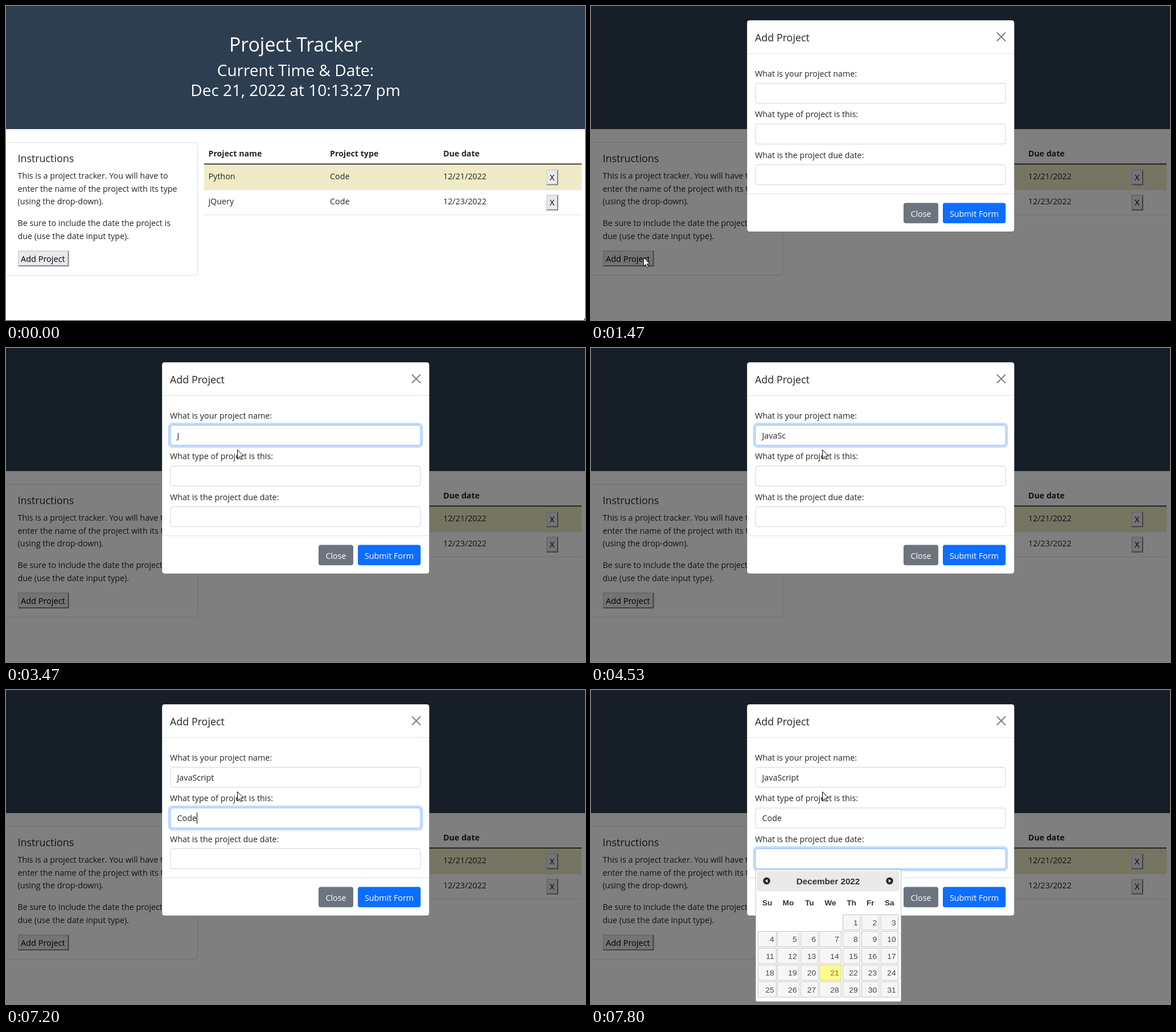
An HTML page for the animation above (8000 ms loop, 1017 by 551 pixels).

```html
<!DOCTYPE html>
<html lang="en">
<head>
<meta charset="utf-8">
<title>Project Tracker</title>
<style>
  html, body { margin: 0; width: 100%; height: 100%; overflow: hidden; background: #fff; }
  svg { display: block; width: 1017px; height: 551px; }
  text { font: 14.3px "Open Sans", "Noto Sans", sans-serif; fill: #212529; white-space: pre; }
  .h1 { font-size: 33.8px; fill: #fff; }
  .h2 { font-size: 28px; fill: #fff; }
  .h5 { font-size: 17.9px; }
  .th { font-size: 14.2px; font-weight: 700; }
  .btn { font-size: 14.5px; fill: #000; }
  .white { fill: #fff; }
  .mid { text-anchor: middle; }
  .cal { font: 13.7px "Liberation Sans", Arial, sans-serif; fill: #454545; }
  .calhead { font-weight: 700; fill: #333; text-anchor: middle; }
  .caltitle { font-size: 15.2px; }
  .end { text-anchor: end; }
  .today { fill: #777620; }
</style>
</head>
<body>
<svg id="stage" viewBox="0 0 1017 551"></svg>
<script>
const LOOP = 8000, TICK = 200 / 3;
const OPEN = 1470, PRESS = 1400, CALENDAR = 7330;

const fields = [
  { label: 'What is your project name:', word: 'JavaScript', y: 135.5, focus: 2400,
    keys: [3270, 3600, 3730, 3800, 4130, 4470, 4800, 5000, 5070, 5200],
    off: [2930, 3470, 4000, 4530, 5530], on: [] },
  { label: 'What type of project is this:', word: 'Code', y: 207, focus: 5670,
    keys: [6070, 6400, 6470, 6670], off: [6200, 6730], on: [7200] },
  { label: 'What is the project due date:', word: '', y: 278.5, focus: CALENDAR,
    keys: [], off: [7800], on: [] }
];

// Cursor legs: first tick, last tick, from, to
const legs = [
  [4, 13, [1016, 548], [92, 441]],
  [25, 32, [92, 441], [400, 151]],
  [38, 40, [400, 151], [406, 178]]
];

const text = (x, y, s, cls = '', id = '') =>
  `<text x="${x}" y="${y}" class="${cls}" id="${id}">${s}</text>`;
const rect = (x, y, w, h, fill, more = '') =>
  `<rect x="${x}" y="${y}" width="${w}" height="${h}" fill="${fill}" ${more}/>`;
const button = (x, y, w, h, id = '') => `<g id="${id}">` +
  rect(x, y, w, h, '#e9e9ed') +
  `<path d="M${x + w - 1} ${y}V${y + h - 1}H${x}" fill="none" stroke="#85858c" stroke-width="2"/>` +
  `<path d="M${x + 1} ${y + h - 1}V${y + 1}H${x + w - 1}" fill="none" stroke="#d6d6da" stroke-width="2"/></g>`;

function page() {
  const lines = [[303, 'This is a project tracker. You will have to'],
    [325.5, 'enter the name of the project with its type'], [348, '(using the drop-down).'],
    [386, 'Be sure to include the date the project is'], [408.5, 'due (use the date input type).']];
  const rows = [['Python', '12/21/2022'], ['jQuery', '12/23/2022']];
  return rect(0, 0, 1017, 216, '#2c3e50') +
    text(508.5, 79.5, 'Project Tracker', 'h1 mid') +
    text(508.5, 122.5, 'Current Time &amp; Date:', 'h2 mid') +
    text(508.5, 157.5, '', 'h2 mid', 'clock') +
    rect(-4.5, 239.5, 341, 233, '#fff', 'rx="4" stroke="#dfdfdf"') +
    text(20.5, 274, 'Instructions', 'h5') +
    lines.map(([y, s]) => text(20.5, y, s)).join('') +
    button(21, 429, 89.5, 28, 'add') + text(26, 449, 'Add Project', 'btn') +
    text(355.5, 264, 'Project name', 'th') + text(569, 264, 'Project type', 'th') +
    text(768, 264, 'Due date', 'th') +
    rect(348, 278, 663, 44, '#eeebc6') + rect(348, 276.5, 663, 1.7, '#212529') +
    rows.map(([name, due], i) => {
      const y = 304 + i * 44.3;
      return rect(348, 322 + i * 44, 663, 1, '#dee2e6') +
        text(355.5, y, name) + text(569, y, 'Code') + text(768, y, due) +
        button(949, y - 17, 21, 27.5) + text(959.3, y + 2, 'X', 'btn mid');
    }).join('');
}

function modal() {
  return rect(0, 0, 1017, 551, '#000', 'opacity=".5"') +
    rect(274, 25, 469.5, 371, '#fff', 'rx="4.5" stroke="#000" stroke-opacity=".2"') +
    text(288, 62, 'Add Project', 'h5') +
    '<path d="M713.5 47L727.5 61M727.5 47L713.5 61" stroke="#7f7f7f" stroke-width="2" stroke-linecap="round"/>' +
    rect(274.5, 83, 468.5, 1, '#dee2e6') + rect(274.5, 329, 468.5, 1, '#dee2e6') +
    fields.map((f, i) => text(288, f.y - 12, f.label) +
      `<rect id="glow${i}" fill="none" stroke="#0d6efd"/>` +
      rect(288.9, f.y, 439.2, 35.2, '#fff', `rx="4" id="box${i}"`) +
      text(300.5, f.y + 23.3, '', '', 'value' + i)).join('') +
    rect(300, 0, 1, 20, '#000', 'id="caret"') +
    rect(549, 345.5, 61, 35.7, '#6c757d', 'rx="3.8"') + text(579.5, 370, 'Close', 'white mid') +
    rect(618, 345.5, 110.3, 35.7, '#0d6efd', 'rx="3.8"') + text(673, 370, 'Submit Form', 'white mid');
}

function calendar() {
  const left = [293.5, 327.5, 368.5, 401.5, 442.5, 475.5, 509];
  const width = [32, 38, 30.5, 38, 30, 30.5, 30.5];
  const arrow = (x, d) => `<circle cx="${x}" cy="335" r="6.2" fill="#2b2b2b"/>` +
    `<path d="M${x + 2.6 * d} 335L${x - 1.6 * d} 332V338Z" fill="#fff"/>`;
  let out = rect(289.5, 315.5, 255, 231, '#fff', 'rx="2.5" stroke="#c5c5c5"') +
    rect(292.5, 318.5, 248, 34, '#e9e9e9', 'rx="3" stroke="#ddd"') +
    text(416.5, 340.5, 'December 2022', 'cal calhead caltitle') + arrow(308.5, -1) + arrow(524.5, 1);
  ['Su', 'Mo', 'Tu', 'We', 'Th', 'Fr', 'Sa'].forEach((d, i) => {
    out += text(left[i] + width[i] / 2, 377.5, d, 'cal calhead');
  });
  for (let d = 1; d <= 31; d++) {
    const col = (d + 3) % 7, y = 394 + Math.floor((d + 3) / 7) * 29.5, now = d === 21;
    out += rect(left[col], y, width[col], 27, now ? '#fffa90' : '#f6f6f6',
        `stroke="${now ? '#dad55e' : '#c5c5c5'}"`) +
      text(left[col] + width[col] - 4, y + 18.5, d, 'cal end' + (now ? ' today' : ''));
  }
  return out;
}

function cursors() {
  return '<g id="cursor" fill="#fff" stroke="#000" stroke-linejoin="round">' +
    '<path id="arrow" d="M.5 .5V15.8L4 12.6L6.3 17.7L8.7 16.7L6.4 11.7H11.2Z"/>' +
    '<path id="hand" d="M-2 14V1.6Q-1.9 0 -.3 0T1.5 1.6V7Q4 6 4.6 8Q7 7 7.4 9Q9.6 8.4 9.8 10.5' +
      'V15Q9.4 17.5 8 19V21.8H-.7V19.5Q-3 16.8 -5.5 13Q-6 11.2 -4.3 11Q-3 11.5 -2 13M1.5 7V12M4.6 8V12M7.4 9V12"/>' +
    '<path id="beam" fill="none" d="M-3 -8.5H-1L0 -7.5L1 -8.5H3M0 -7.5V7.5M-3 8.5H-1L0 7.5L1 8.5H3"/></g>';
}

const stage = document.getElementById('stage');
stage.innerHTML = page() + `<g id="modal">${modal()}</g><g id="calendar">${calendar()}</g>` + cursors();
const $ = id => document.getElementById(id);
const set = (id, attrs) => { for (const k in attrs) $(id).setAttribute(k, attrs[k]); };
const show = (id, on) => set(id, { display: on ? 'inline' : 'none' });
const put = (id, s) => { if ($(id).textContent !== s) $(id).textContent = s; };
const clamp = v => Math.max(0, Math.min(1, v));
const mix = (a, b, p) => a + (b - a) * p;
const ramp = d => d < -10 ? 0 : clamp((d + 30) / 150);
const inside = (x, y, l, t, r, b) => x >= l && x <= r && y >= t && y <= b;

function cursorAt(tick) {
  let pos = legs[0][2];
  for (const [first, last, from, to] of legs) {
    if (tick < first) break;
    const p = clamp((tick - first + 1) / (last - first + 1));
    const e = p * p * (3 - 2 * p);
    pos = [Math.round(mix(from[0], to[0], e)), Math.round(mix(from[1], to[1], e))];
  }
  return pos;
}

function drawAdd(hover, pressed) {
  const [face, low, high] = $('add').children;
  face.setAttribute('fill', pressed ? '#b1b1b9' : hover ? '#d0d0d7' : '#e9e9ed');
  low.setAttribute('stroke', pressed ? '#d6d6da' : '#85858c');
  high.setAttribute('stroke', pressed ? '#85858c' : '#d6d6da');
}

function drawFields(t, now) {
  show('caret', false);
  fields.forEach((f, i) => {
    const next = fields[i + 1], blur = next ? next.focus : Infinity;
    const p = ramp(now - f.focus) - ramp(now - blur);
    const spread = 3.8 * p, h = spread / 2;
    set('box' + i, { stroke: `rgb(${mix(206, 134, p)},${mix(212, 183, p)},${mix(218, 254, p)})` });
    set('glow' + i, { x: 288.4 - h, y: f.y - .5 - h, width: 440.2 + spread, height: 36.2 + spread,
      rx: 4 + h, 'stroke-width': spread, 'stroke-opacity': .25 * p });
    put('value' + i, f.word.slice(0, f.keys.filter(k => k <= t).length));

    if (t < f.focus || t >= blur) return;
    const latest = list => Math.max(0, ...list.filter(k => k <= t));
    const end = $('value' + i).textContent ? $('value' + i).getComputedTextLength() : 0;
    set('caret', { x: Math.round(300.8 + end), y: f.y + 8 });
    show('caret', latest([f.focus, ...f.keys, ...f.on]) > latest(f.off));
  });
}

function draw(t) {
  const tick = Math.floor((t + 4) / TICK), now = tick * TICK;
  const open = t >= OPEN;
  const [x, y] = cursorAt(tick);
  const hover = !open && inside(x, y, 21, 429, 110, 457);
  const beam = open && fields.some(f => inside(x, y, 289, f.y, 728, f.y + 35));

  put('clock', `Dec 21, 2022 at 10:13:${t < 600 ? 27 : 28} pm`);
  drawAdd(hover, hover && t >= PRESS);
  show('modal', open);
  if (open) drawFields(t, now);

  const fade = clamp((tick - 109) / 3);
  show('calendar', fade > 0);
  set('calendar', { opacity: fade });

  show('cursor', t < 130 || t >= 270);
  set('cursor', { transform: `translate(${x} ${y})` });
  show('arrow', !hover && !beam);
  show('hand', hover);
  show('beam', beam);
}

const start = performance.now();
function frame() {
  draw((performance.now() - start) % LOOP);
  requestAnimationFrame(frame);
}
frame();
</script>
</body>
</html>
```
